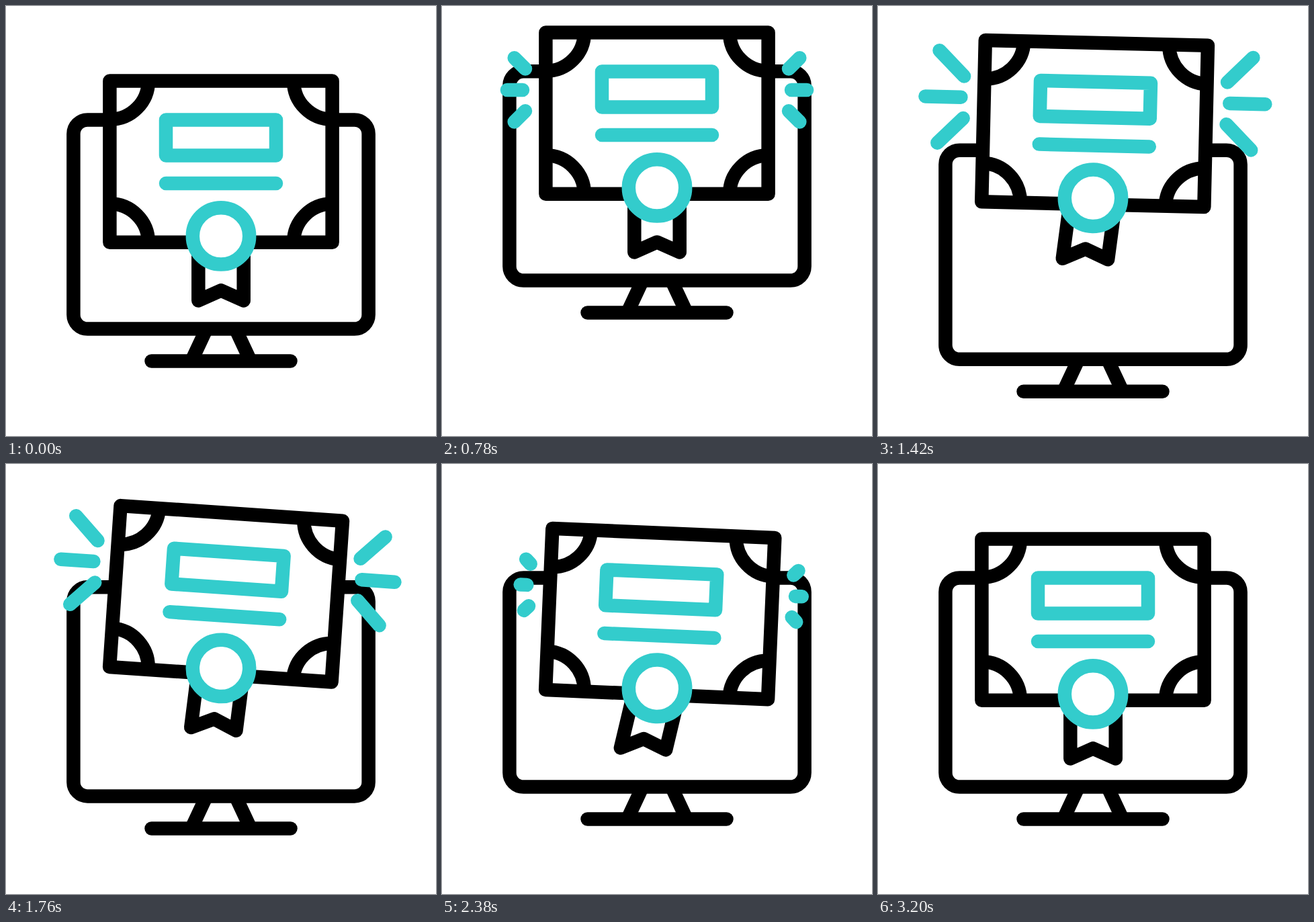
These frames come from a looping animation (640x640 px, 3600 ms). An HTML page:

```html
<!DOCTYPE html>
<html>
<head>
<meta charset="utf-8">
<style>
html, body { margin: 0; height: 100%; overflow: hidden; background: #fff }
svg { display: block; width: 100vw; height: 100vh }
g { fill: none; stroke: #000; stroke-width: 20.5; stroke-linecap: round; stroke-linejoin: round }
.fill { fill: #fff }
.teal { stroke: #3cc }
</style>
</head>
<body>
<svg viewBox="0 0 640 640">
  <g id="monitor">
    <path stroke-linecap="butt" d="M296.8 484L277.6 525M343.2 484L362.4 525"/>
    <rect x="100.4" y="169.4" width="439.2" height="311.2" rx="21"/>
    <path d="M216.5 528.5H423.5"/>
  </g>
  <!-- the card's own origin is the centre of its medal -->
  <g id="card">
    <rect class="fill" x="-165.6" y="-231" width="331.2" height="240.4"/>
    <path id="corners" stroke-linecap="butt"/>
    <path class="teal" d="M-82-173H82V-120H-82ZM-82-78.3H82"/>
    <path id="ribbon" class="fill"/>
    <circle class="teal fill" r="42.2"/>
    <path id="rays" class="teal"/>
  </g>
</svg>
<script>
const $ = id => document.getElementById(id);
const { sin, cos, abs, min, max, PI, SQRT1_2 } = Math;
const LOOP = 3600, END = 3200;
const CROUCH = 390, APEX = 840;                 // jump timing
const SWING = 940;                              // card and ribbon start to sway
const RAY = 53, BEAT = 392, FIRST = 635, LAST = FIRST + 5 * BEAT;

const clamp = (v, lo, hi) => min(hi, max(lo, v));
const ramp = (t, from, to) => {
  const u = clamp((t - from) / (to - from), 0, 1);
  return u * u * (3 - 2 * u);
};

// crouch, jump together, then the monitor drops while the card floats down
const monitorY = t => 56 * (ramp(t, 0, CROUCH) - ramp(t, 1178, 2040))
  - 134.6 * (ramp(t, CROUCH, APEX) - ramp(t, APEX, 1178));
const cardY = t => 51 * ramp(t, 0, CROUCH) - 130 * ramp(t, CROUCH, APEX) + 79 * ramp(t, 660, 2825);

// fading swing of the card: four half waves
const tilt = t => -(4084 - t) / 346 * sin(PI * clamp((t - SWING) / 455, 0, 4));

// the ribbon flutters faster: four full waves
const sway = t => 17 * sin(2 * PI * clamp((t - SWING) / 530, 0, 4));
const lift = t => 5 * (ramp(t, 800, 1050) - ramp(t, 2680, 3190));

function cornersPath() {
  const r = 57.5;
  let d = '';
  for (const sx of [-1, 1])
    for (const sy of [-1, 1]) {
      const x = sx * 165.6, y = -110.8 + sy * 120.2;
      d += `M${x - sx * r} ${y}A${r} ${r} 0 0 ${sx * sy > 0 ? 1 : 0} ${x} ${y - sy * r}`;
    }
  return d;
}

function ribbonPath(t) {
  const w = 33.7, x = sway(t), y = 96 - lift(t);
  return `M${-w} 5L${x - w} ${y}L${x} ${y - 15}L${x + w} ${y}L${w} 5`;
}

function raysPath(t) {
  if (t < FIRST - BEAT / 2) return '';
  const from = RAY * ramp(t, LAST, LAST + 400);
  const to = t > LAST ? RAY : RAY * abs(cos(PI * (t - FIRST) / BEAT)) ** .9;
  if (to - from < .3) return '';
  let d = '';
  for (const side of [-1, 1])
    for (const k of [-1, 0, 1]) {
      const dx = k ? SQRT1_2 : 1, dy = k * SQRT1_2;
      const at = s => `${side * (200 - 4 * abs(k) + s * dx)} ${-145.5 + k * 31.3 + s * dy}`;
      d += `M${at(from)}L${at(to)}`;
    }
  return d;
}

function draw(time) {
  const t = min(time % LOOP, END);
  $('monitor').setAttribute('transform', `translate(0 ${monitorY(t)})`);
  $('card').setAttribute('transform', `translate(320 ${342.4 + cardY(t)}) rotate(${tilt(t)})`);
  $('ribbon').setAttribute('d', ribbonPath(t));
  $('rays').setAttribute('d', raysPath(t));
}

let start;
function tick(now) {
  start ??= now;
  draw(now - start);
  requestAnimationFrame(tick);
}
$('corners').setAttribute('d', cornersPath());
draw(0);
requestAnimationFrame(tick);
</script>
</body>
</html>
```
